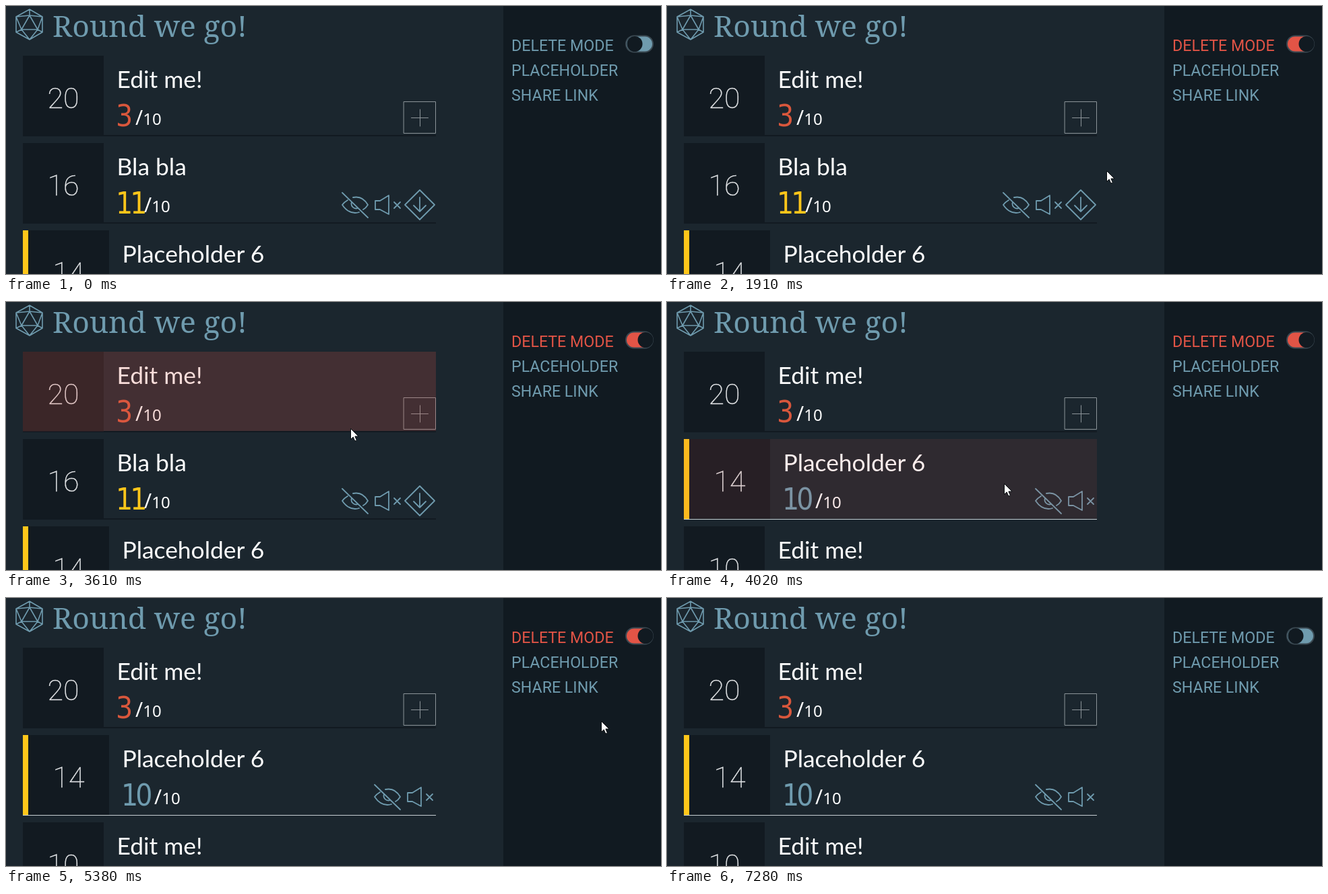
These frames come from a looping animation (972 px wide and 399 px high, 7750 ms). An HTML page:

```html
<!DOCTYPE html>
<html lang="en">
<head>
<meta charset="utf-8">
<title>Initiative tracker</title>
<style>
html, body { margin: 0; width: 100%; height: 100%; overflow: hidden; background: #1b262e; }
svg { display: block; width: 100%; height: 100%; }
.title { font: 400 44.5px "Noto Serif", serif; fill: #6f9bae; }
.menu { font: 400 23.2px Roboto, sans-serif; fill: #6f9bae; }
.order { font: 100 43px Roboto, sans-serif; fill: #e6e8ea; stroke: #e6e8ea; stroke-width: .4; text-anchor: middle; }
.name { font: 400 35.4px Lato, sans-serif; fill: #fff; }
.hp { font: condensed 44px "DejaVu Sans", sans-serif; letter-spacing: -4px; }
.max { font: 400 24px "Noto Sans", sans-serif; fill: #fff; }
.icon { fill: none; stroke: #6f9bae; stroke-width: 1.8; stroke-linejoin: round; stroke-linecap: round; }
.dark { fill: #121a21; }
</style>
</head>
<body>
<svg id="stage" viewBox="0 0 972 399" preserveAspectRatio="none"></svg>
<script>
const LOOP = 7750, STEP = 70;
const BLUE = [111, 155, 174], RED = [226, 84, 70];

const eye = x => `<path class="icon" transform="translate(${x} 73)"
  d="M0 1 38 38M8 12Q3 15 0 19Q8 31 19 31 22 31 25 30M16 8Q30 5 38 19 35 24 31 26M14 15A7 7 0 0 0 23 24"/>`;
const speaker = x => `<path class="icon" transform="translate(${x} 78)"
  d="M1 8H8L21 0V28L8 21H1ZM29 10 38 19M38 10 29 19"/>`;
const diamond = `<path class="icon"
  d="M614 70 636 92 614 114 592 92ZM614 81V102M605 93 614 102 623 93"/>`;
const plus = `<path class="icon" style="stroke:#8c9499;stroke-width:1;stroke-linejoin:miter"
  d="M590.5 68.5H637.5V115.5H590.5ZM601.5 92.5H626.5M614.5 80V105"/>`;

function row({ id, order, name, hp, color, maxX, icons = '', active }) {
  const dx = active ? 8 : 0;
  const line = active
    ? `<rect id="line" x="25" y="119" width="613" height="1"/>`
    : `<rect class="dark" x="145" y="118" width="493" height="2"/>`;
  return `<g id="${id}">
    <rect class="dark" x="${25 + dx}" width="120" height="${active ? 119 : 120}"/>
    ${active ? '<rect x="25" width="8" height="119" fill="#ffc61a"/>' : ''}
    <text class="order" x="${85 + dx}" y="78">${order}</text>
    <text class="name" x="${164.5 + dx}" y="48">${name}</text>
    <text class="hp" x="${163 + dx}" y="105" fill="${color}">${hp}</text>
    <text class="max" x="${maxX}" y="103"><tspan font-size="30">/</tspan>10</text>
    ${icons}
    <rect class="shade" x="25" width="613" height="118.5" fill="#e05545" opacity="0"/>
    ${line}</g>`;
}

const rows = [
  { id: 'a', order: 20, name: 'Edit me!', hp: 3, color: '#d9573c', maxX: 192, icons: plus },
  { id: 'b', order: 16, name: 'Bla bla', hp: 11, color: '#ffc61a', maxX: 205,
    icons: eye(499) + speaker(547) + diamond },
  { id: 'c', order: 14, name: 'Placeholder 6', hp: 10, color: '#6f9bae', maxX: 220,
    icons: eye(547) + speaker(595), active: true },
  { id: 'd', order: 10, name: 'Edit me!', hp: 10, color: '#6f9bae', maxX: 212 }
];

const menu = ['DELETE MODE', 'PLACEHOLDER', 'SHARE LINK'].map((label, i) =>
  `<text class="menu" id="menu${i}" x="750" y="${67 + 37 * i}">${label}</text>`).join('');

document.getElementById('stage').innerHTML = `
  <rect width="972" height="399" fill="#1b262e"/>
  <path class="icon" style="stroke-width:1.6"
    d="M35 5 54 16V39L35 50 15 39V16ZM35 14 23 35H47ZM35 5V14M15 16 35 14 54 16M15 16 23 35 15 39M54 16 47 35 54 39M23 35 35 50 47 35"/>
  <text class="title" x="69" y="45.5">Round we go!</text>
  ${rows.map(row).join('')}
  <rect x="738" width="234" height="399" fill="#111a21"/>
  ${menu}
  <rect id="track" x="920" y="44.5" width="40" height="24" rx="12" stroke="#3b4952" stroke-width="2"/>
  <circle id="thumb" cy="56.5" r="11.5" fill="#111a21"/>
  <path id="cursor" d="M.5.5V16.5L4.2 13 6.8 19 9.4 17.9 6.9 12H12Z" fill="#fff" stroke="#0b0f12"/>`;

const el = Object.fromEntries(
  [...document.querySelectorAll('[id]')].map(node => [node.id, node]));

// Pointer moves; each starts where the last one ended, and `bend` curves it.
const ENTRY = [930, 361];
const moves = [
  { start: 600, end: 1360, to: [945, 57], bend: [946, 40] },
  { start: 1420, end: 2050, to: [592, 224], bend: [715, 308] },
  { start: 2780, end: 3060, to: [515, 160] },
  { start: 3540, end: 3820, to: [500, 270] },
  { start: 4020, end: 4090, to: [500, 270] },
  { start: 4890, end: 5660, to: [937, 32], bend: [946, 290] },
  { start: 5790, end: 5790, to: [925, 44] },
  { start: 6120, end: 6490, to: [946, 58], bend: [944, 58] },
  { start: 6800, end: 7280, to: [922, 399], bend: [945, 200] }
];
const LEAVE = moves.at(-1).end;

const clamp = v => Math.max(0, Math.min(1, v));
const mix = (a, b, k) => a + (b - a) * k;

// The screen refreshes in steps during a move and holds still between moves.
function sample(time) {
  const i = moves.findLastIndex(m => m.start <= time);
  if (i < 0) return { t: 0 };
  const { start, end, to, bend } = moves[i];
  const t = time >= end ? end : start + Math.floor((time - start) / STEP) * STEP;
  if (t >= LEAVE) return { t };
  const from = i ? moves[i - 1].to : ENTRY;
  const k = end > start ? (t - start) / (end - start) : 1;
  const at = from.map((p, axis) => {
    const mid = bend ? bend[axis] : (p + to[axis]) / 2;
    return Math.round(mix(mix(p, mid, k), mix(mid, to[axis], k), k));
  });
  return { t, at };
}

function render(time) {
  const { t, at } = sample(time);
  const ramp = from => clamp((t - from + STEP) / (2 * STEP));
  const during = (on, off) => ramp(on) - ramp(off);
  const removed = t >= 4020;

  rows.forEach(({ id }, i) => {
    const slot = removed && i > 1 ? i - 1 : i;
    el[id].setAttribute('transform', `translate(0 ${74 + slot * 130})`);
  });
  el.b.style.display = removed ? 'none' : '';

  const hover = {
    a: during(2920, 3680),
    b: during(1980, 2920) + during(3680, 4020),
    c: during(4020, 5100)
  };
  for (const id in hover)
    el[id].querySelector('.shade').setAttribute('opacity', hover[id] * 0.2);
  el.line.setAttribute('fill', hover.c > 0.5 ? '#7fa3b2' : '#c6ced2');

  const on = during(1230, 6400);
  const color = `rgb(${BLUE.map((c, i) => Math.round(mix(c, RED[i], on)))})`;
  el.menu0.style.fill = color;
  el.track.setAttribute('fill', color);
  el.thumb.setAttribute('cx', mix(933, 949, on));

  el.cursor.style.display = at ? '' : 'none';
  if (at) el.cursor.setAttribute('transform', `translate(${at})`);
}

const began = performance.now();
function tick() {
  render((performance.now() - began) % LOOP);
  requestAnimationFrame(tick);
}
tick();
</script>
</body>
</html>
```
